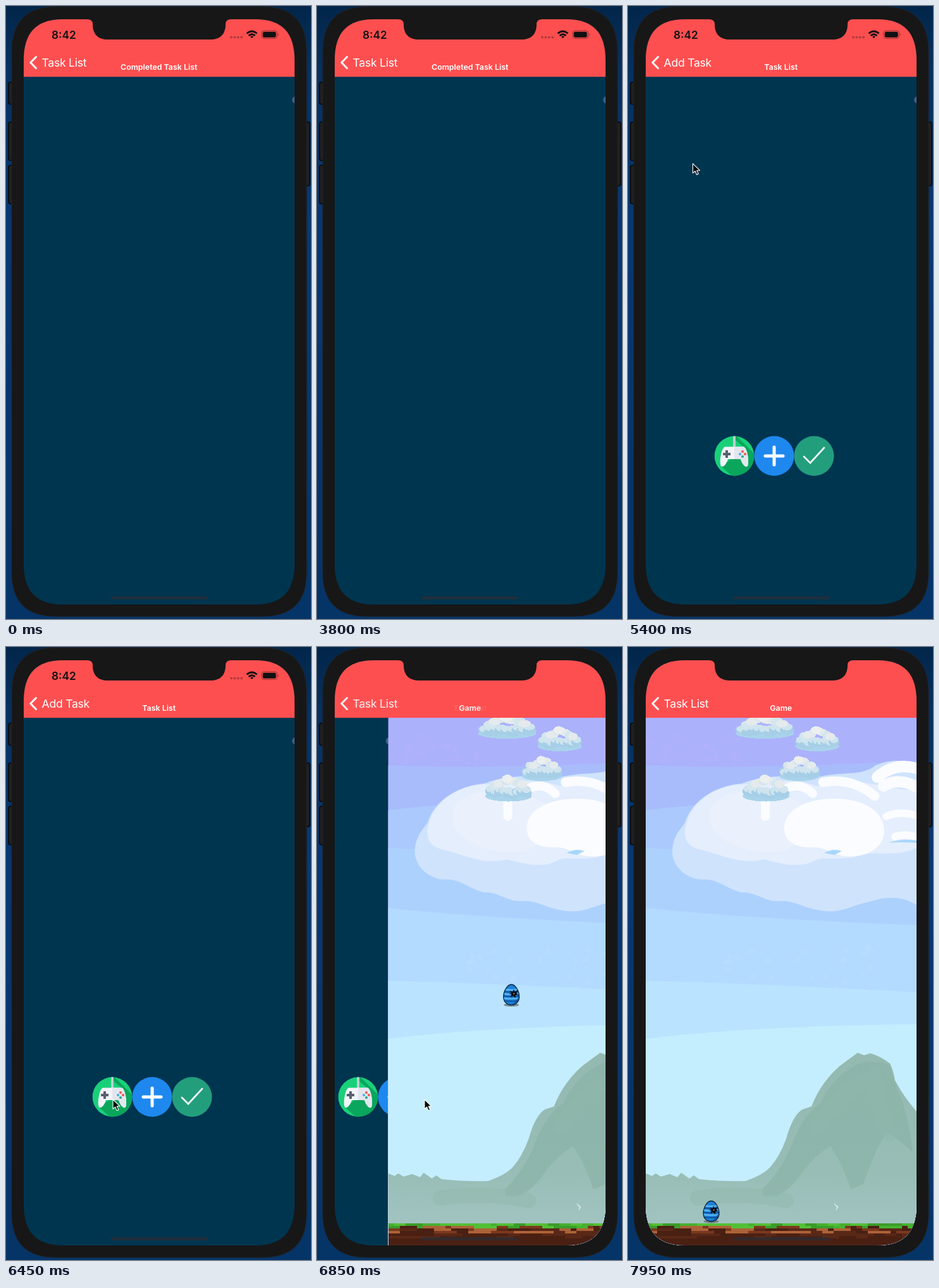
An HTML page for the animation above (8 s loop, 482 px wide and 970 px high).

```html
<!DOCTYPE html>
<html lang="en">
<head>
<meta charset="utf-8">
<title>Task list</title>
<style>
  html, body { margin: 0; width: 100%; height: 100%; overflow: hidden; background: #08346b; }
  svg { display: block; width: 100%; height: 100%; }
  text { font-family: Inter, Roboto, sans-serif; fill: #fff; }
  .back { font-size: 17.6px; letter-spacing: -.25px; }
  .title { font-size: 12.4px; font-weight: 600; text-anchor: middle; }
  .time { font-size: 17.2px; font-weight: 600; fill: #111; }
</style>
</head>
<body>
<svg viewBox="0 0 482 970" preserveAspectRatio="none">
  <defs>
    <linearGradient id="desk" x2="0" y2="1">
      <stop offset="0" stop-color="#02264a"/><stop offset=".1" stop-color="#06305f"/>
      <stop offset=".35" stop-color="#083871"/><stop offset="1" stop-color="#053467"/>
    </linearGradient>
    <linearGradient id="haze" x2="0" y2="1">
      <stop offset="0" stop-color="#94b9b0"/><stop offset=".7" stop-color="#98bdb6"/>
      <stop offset="1" stop-color="#a2c4c1"/>
    </linearGradient>
    <clipPath id="screen">
      <path d="M28 86C28 42 48 21 90 21H394C436 21 456 42 456 86V882C456 926 436 947 394 947H90C48 947 28 926 28 882Z"/>
    </clipPath>
    <clipPath id="page"><rect x="28" y="111.5" width="428" height="836"/></clipPath>
    <clipPath id="disc"><circle r="31.5"/></clipPath>
    <clipPath id="shell"><path id="eggShape" d="M0 -16.5C7 -16.5 12.5 -5 12.5 3C12.5 11 7 16 0 16S-12.5 11 -12.5 3C-12.5 -5 -7 -16.5 0 -16.5Z"/></clipPath>
  </defs>

  <rect width="482" height="970" fill="url(#desk)"/>
  <g fill="#202020" stroke="#070709" stroke-width="1.5">
    <rect x="4" y="120.5" width="10" height="35" rx="3"/>
    <rect x="4" y="183.5" width="10" height="61" rx="3"/>
    <rect x="4" y="252" width="10" height="61" rx="3"/>
    <rect x="470" y="183.5" width="10" height="101" rx="3"/>
  </g>
  <path d="M9 72C9 25 32 1 79 1H405C452 1 475 25 475 72V896C475 943 452 966 405 966H79C32 966 9 943 9 896Z"
        fill="#171717" stroke="#222328"/>

  <g clip-path="url(#screen)">
    <rect x="28" y="21" width="428" height="926" fill="#003550"/>
    <g clip-path="url(#page)">
      <g id="list">
        <g transform="translate(168 712)">
          <g clip-path="url(#disc)">
            <circle r="31.5" fill="#19d079"/>
            <path d="M2 -33L35 0V35H0L-20 17L16 -13L2 -25Z" fill="#0aa65c"/>
          </g>
          <path d="M-1.8 -31.4H1.8V-13H-1.8Z" fill="#c5d0d6"/>
          <path d="M-15 -14.5H15C21 -12 24 11 21 16C18 19 13 14 10 5H-10C-13 14 -18 19 -21 16C-24 11 -21 -12 -15 -14.5Z" fill="#f3f4fa"/>
          <path d="M0 -14.5H15C21 -12 24 11 21 16C18 19 13 14 10 5H0Z" fill="#e3e6ef"/>
          <path d="M-12 -9V3M-18 -3H-6" stroke="#56616e" stroke-width="4"/>
          <circle cx="9" cy="-3" r="2" fill="#3cb1e4"/><circle cx="13" cy="-7" r="2" fill="#ef5550"/>
          <circle cx="17" cy="-3" r="2" fill="#ef5550"/><circle cx="13" cy="1" r="2" fill="#20a98a"/>
        </g>
        <g transform="translate(231 712)" fill="none" stroke="#fff" stroke-linecap="round">
          <circle r="31.5" fill="#1e88ef" stroke="none"/>
          <path d="M0 -14V14M-14 0H14" stroke-width="5"/>
        </g>
        <g transform="translate(294 712)" fill="none" stroke="#f4faf8" stroke-linecap="round">
          <circle r="31.5" fill="#239e7d" stroke="none"/>
          <path d="M-16 1L-6 11L16 -13" stroke-width="2.6"/>
        </g>
      </g>

      <rect id="done" x="28" y="111" width="428" height="836" fill="#003550"/>

      <g id="game">
        <rect x="28" y="111" width="428" height="836" fill="#acb1fc"/>
        <g id="sky"></g>
        <path d="M70 326C70 300 82 290 90 278C98 250 130 220 180 216C220 200 260 205 300 206C340 196 370 205 390 188C420 174 440 182 456 184V408C430 392 405 396 385 402C350 410 340 420 312 418C275 414 265 400 238 402C215 403 205 388 178 388C155 382 140 366 118 368C95 368 72 350 70 326Z" fill="#cfe3fd"/>
        <path d="M90 290C95 245 140 216 190 217C240 210 270 210 300 220C380 200 400 230 456 225V318C420 335 380 320 360 332C330 338 310 330 295 338C270 352 240 342 215 336C180 345 150 330 120 322C100 318 88 310 90 290Z" fill="#e4eefd"/>
        <path d="M130 258C150 215 240 225 276 248C300 280 280 320 230 324C180 328 120 300 130 258Z" fill="#edf3fd" opacity=".8"/>
        <path d="M247 288C246 256 285 240 325 240C372 239 405 260 405 292C404 322 370 334 345 331C320 328 312 316 292 317C265 318 248 308 247 288Z" fill="#fbfcff"/>
        <g fill="none" stroke="#fbfcff" stroke-linecap="round">
          <path d="M243 228Q270 210 292 232M217 240V268" stroke-width="14"/>
          <path d="M308 214Q354 206 390 236" stroke-width="15"/>
          <path d="M394 206Q424 180 462 194M404 220Q430 204 464 226" stroke-width="18"/>
          <path d="M408 268Q432 258 460 268M422 300Q440 294 460 302" stroke-width="12"/>
        </g>
        <path d="M310 326Q324 318 338 323L326 329ZM412 310Q430 303 456 306V310Q430 308 412 310Z" fill="#a8d6fb"/>
        <g id="puffs" shape-rendering="crispEdges"></g>

        <path d="M28 833L38 837L44 833L52 838L66 834L78 839L84 832L97 841L104 836L112 842Q150 846 186 845Q212 836 224 824Q240 806 250 778Q260 742 275 732L290 727Q298 706 310 690Q326 668 344 656L363 642L373 646L383 643Q396 646 414 659Q420 672 422 686Q436 712 456 735V916H28Z" fill="url(#haze)"/>
        <path d="M212 858Q246 826 264 774Q282 736 304 722Q328 672 374 656Q400 655 414 662Q420 690 434 720Q446 760 450 800Q430 780 410 768Q392 790 372 850L352 858Q340 820 320 790Q290 808 268 842Q240 876 214 868Z" fill="#8bb2a6" opacity=".65"/>
        <path d="M300 760Q326 712 370 690M388 674Q394 728 414 770M110 872Q180 862 250 876" fill="none" stroke="#8fb6ac" stroke-width="24" stroke-linecap="round" opacity=".45"/>
        <path d="M326 881L332 886L329 891L331 887Z" fill="#d7effa" stroke="#d7effa"/>
        <g id="ground" shape-rendering="crispEdges"></g>

        <g id="egg">
          <ellipse cy="16" rx="12" ry="2.5" fill="#5a6268" opacity=".7"/>
          <g clip-path="url(#shell)">
            <rect x="-14" y="-18" width="28" height="36" fill="#1b7fd6"/>
            <path d="M-14 -9Q0 -7 14 -9M-14 -2Q0 0 14 -2M-14 5Q0 7 14 5" fill="none" stroke="#58b7f2" stroke-width="2.6"/>
            <path d="M-14 -5.5Q0 -3.5 14 -5.5M-14 1.5Q0 3.5 14 1.5M-14 9Q0 11 14 9" fill="none" stroke="#0d4790" stroke-width="1.4"/>
            <path d="M13 -8V18H-6Q12 12 13 -8Z" fill="#0a3b86" opacity=".45"/>
          </g>
          <use href="#eggShape" fill="none" stroke="#10263f" stroke-width="1.3"/>
          <path d="M-3 -6L2 -5L4 -9L5 -5L10 -7L8 -3L11 0L7 0L6 5L3 1L-1 4L0 -1L-4 -2L0 -3Z" fill="#0b0d12"/>
          <circle cx="4" cy="-2" r="1.2" fill="#78818a"/>
        </g>
      </g>
    </g>

    <rect x="28" y="21" width="428" height="91" fill="#fe4f50"/>
    <g id="nav"></g>
    <g id="status" fill="#111">
      <text class="time" x="72" y="51.5">8:42</text>
      <g id="dots" opacity=".3"></g>
      <g fill="none" stroke="#111" stroke-width="2.8">
        <path d="M380.5 43.5Q388.5 36.5 396.5 43.5M383.5 47Q388.5 42.6 393.5 47"/>
        <path d="M386 48.5Q388.5 46.4 391 48.5L388.5 51Z" fill="#111" stroke="none"/>
      </g>
      <rect x="404" y="39" width="24.5" height="12.5" rx="3.8" fill="none" stroke="#111" opacity=".45"/>
      <rect x="405.7" y="40.7" width="21" height="9.1" rx="2.4"/>
      <path d="M430 43.2Q432 45.2 430 47.4Z" opacity=".5"/>
    </g>
    <rect x="165.5" y="934" width="153" height="5" rx="2.5" fill="#2b2d35" opacity=".72"/>
  </g>
  <path d="M128 19V21Q137 21 137 29C137 45 146 53 161 53H323C338 53 347 45 347 29Q347 21 356 21V19Z" fill="#171717"/>

  <path id="cursor" d="M0 0V15L3.6 11.8L6.2 17.6L8.8 16.4L6.3 10.8H11Z" fill="#0a0a0a" stroke="#fff" stroke-width="1.1" stroke-linejoin="round"/>
</svg>
<script>
const LOOP = 8000, WIDTH = 428, PARALLAX = 0.3 * WIDTH;
const POP = 4550, PUSH = 6636, DROP = 6700;

const $ = id => document.getElementById(id);
const clamp = v => Math.min(1, Math.max(0, v));
const lerp = (a, b, k) => a + (b - a) * k;

function add(parent, tag, attrs, text) {
  const el = document.createElementNS('http://www.w3.org/2000/svg', tag);
  for (const key in attrs) el.setAttribute(key, attrs[key]);
  if (text) el.textContent = text;
  parent.appendChild(el);
  return el;
}

function seeded(seed) {
  return () => (seed = (seed * 16807) % 2147483647) / 2147483647;
}

// Each sky band runs from its upper edge down to the ground.
function buildSky() {
  const rnd = seeded(41);
  const bands = [
    [187, 194, 180, '#a8bcfc'], [258, 240, 238, '#abc9fc'], [318, 326, 322, '#add1fd'],
    [413, 430, 440, '#b3daff'], [528, 532, 546, '#bae3ff'], [620, 600, 597, '#c4eefe']
  ];
  for (const [left, mid, right, fill] of bands) {
    add($('sky'), 'path', { d: `M28 ${left}Q190 ${mid} 456 ${right}V947H28Z`, fill });
  }
  for (let i = 0; i < 80; i++) {
    const low = i % 2;
    add($('sky'), 'circle', {
      cx: low ? 150 + 240 * rnd() : 30 + 150 * rnd(),
      cy: low ? 475 + 65 * rnd() : 125 + 60 * rnd(),
      r: 2 + 4 * rnd(), fill: low ? '#bce2ff' : '#b4b1fd', opacity: 0.35
    });
  }
}

function addPuff(x, y, w, h, seed) {
  const rnd = seeded(seed), g = $('puffs');
  const blob = (u, v, r, fill) => add(g, 'ellipse', {
    cx: x + u * w / 2, cy: y + v * h / 2, rx: r * w / 2, ry: r * h * 0.62, fill
  });
  add(g, 'ellipse', { cx: x, cy: y + h * 0.3, rx: w / 2, ry: h * 0.19, fill: '#a9d3ea' });
  for (let i = 0; i < 9; i++) {
    const u = -0.76 + i * 0.19;
    blob(u, 0.28 + 0.3 * rnd(), 0.24, '#a6cfe7');
    blob(u, 0.1 + 0.25 * rnd(), 0.2, '#cfe4ee');
  }
  for (let i = 0; i < 8; i++) {
    const u = -0.6 + i * 0.17;
    blob(u, -0.62 * (1 - Math.abs(u)) + 0.2 * rnd(), 0.22, i % 3 ? '#e5eaec' : '#d4e6ee');
  }
  blob(-0.05, -0.58, 0.23, '#eceff0');
}

function buildGround() {
  const rnd = seeded(97), g = $('ground');
  const grass = ['#3b9d2a', '#53c035', '#48b130'];
  const soil = ['#4a2013', '#4a2013', '#592817', '#7a381e', '#ad6238'];
  add(g, 'rect', { x: 28, y: 912, width: 428, height: 35, fill: '#4a2013' });
  for (let row = 0; row < 6; row++) {
    for (let x = 28; x < 456;) {
      const width = 9 * (1 + Math.floor(rnd() * 4));
      const green = row === 0 || (row === 1 && rnd() < 0.6);
      const set = green ? grass : soil;
      const shades = green || row < 4 ? set.length : 3;
      add(g, 'rect', { x, y: 912 + row * 3.9, width, height: 4, fill: set[Math.floor(rnd() * shades)] });
      x += width;
    }
  }
}

function addNav(back, title) {
  const g = add($('nav'), 'g', {});
  add(g, 'path', {
    d: 'M47.5 80.5L38.8 89.5L47.5 98.5', fill: 'none', stroke: '#fff',
    'stroke-width': 3, 'stroke-linecap': 'round', 'stroke-linejoin': 'round'
  });
  add(g, 'text', { class: 'back', x: 56.5, y: 96 }, back);
  add(g, 'text', { class: 'title', x: 241.7, y: 100.5 }, title);
  return g;
}

buildSky();
addPuff(216, 124, 92, 43, 5);
addPuff(299, 144, 70, 43, 9);
addPuff(271, 191, 64, 43, 14);
addPuff(218, 222, 74, 46, 23);
buildGround();
for (let i = 0; i < 4; i++) add($('dots'), 'circle', { cx: 356 + i * 5.4, cy: 49.5, r: 2 });
const navDone = addNav('Task List', 'Completed Task List');
const navList = addNav('Add Task', 'Task List');
const navGame = addNav('Task List', 'Game');

// Critically damped spring, as in the system page transition.
function spring(ms) {
  const u = Math.max(0, ms) * 0.014;
  return 1 - (1 + u) * Math.exp(-u);
}
const fadeIn = p => clamp((p - 0.25) / 0.62);
const fadeOut = p => clamp((0.85 - p) / 0.5);

// Time, x, y of the pointer.
const trail = [
  [4050, -14, 150], [4450, 79, 85], [5050, 79, 85], [6100, 169, 716],
  [6600, 169, 716], [6900, 170, 716], [7350, -14, 640]
];

function pointer(t) {
  for (let i = 1; i < trail.length; i++) {
    const [t0, x0, y0] = trail[i - 1], [t1, x1, y1] = trail[i];
    if (t >= t0 && t < t1) {
      const k = (t - t0) / (t1 - t0), e = k * k * (3 - 2 * k);
      return [lerp(x0, x1, e), lerp(y0, y1, e)];
    }
  }
  return [-40, 0];
}

const place = (el, x, y = 0) => el.setAttribute('transform', `translate(${x} ${y})`);
const fade = (el, o) => el.setAttribute('opacity', o);

function draw(t) {
  const pop = spring(t - POP), push = spring(t - PUSH);

  place($('done'), WIDTH * pop);
  place($('list'), -PARALLAX * (1 - pop + push));
  place($('game'), WIDTH * (1 - push));

  fade(navDone, fadeOut(pop));
  fade(navList, Math.min(fadeIn(pop), fadeOut(push)));
  fade(navGame, fadeIn(push));
  fade($('status'), t < PUSH ? 1 : 0);

  const fall = Math.max(0, t - DROP) / 1000;
  const drift = clamp((t - 6800) / 1100);
  place($('egg'), lerp(227, 131.5, drift), Math.min(893, 530 + 900 * fall * fall));

  place($('cursor'), ...pointer(t));
}

const start = performance.now();
function tick() {
  draw((performance.now() - start) % LOOP);
  requestAnimationFrame(tick);
}
draw(0);
requestAnimationFrame(tick);
</script>
</body>
</html>
```
